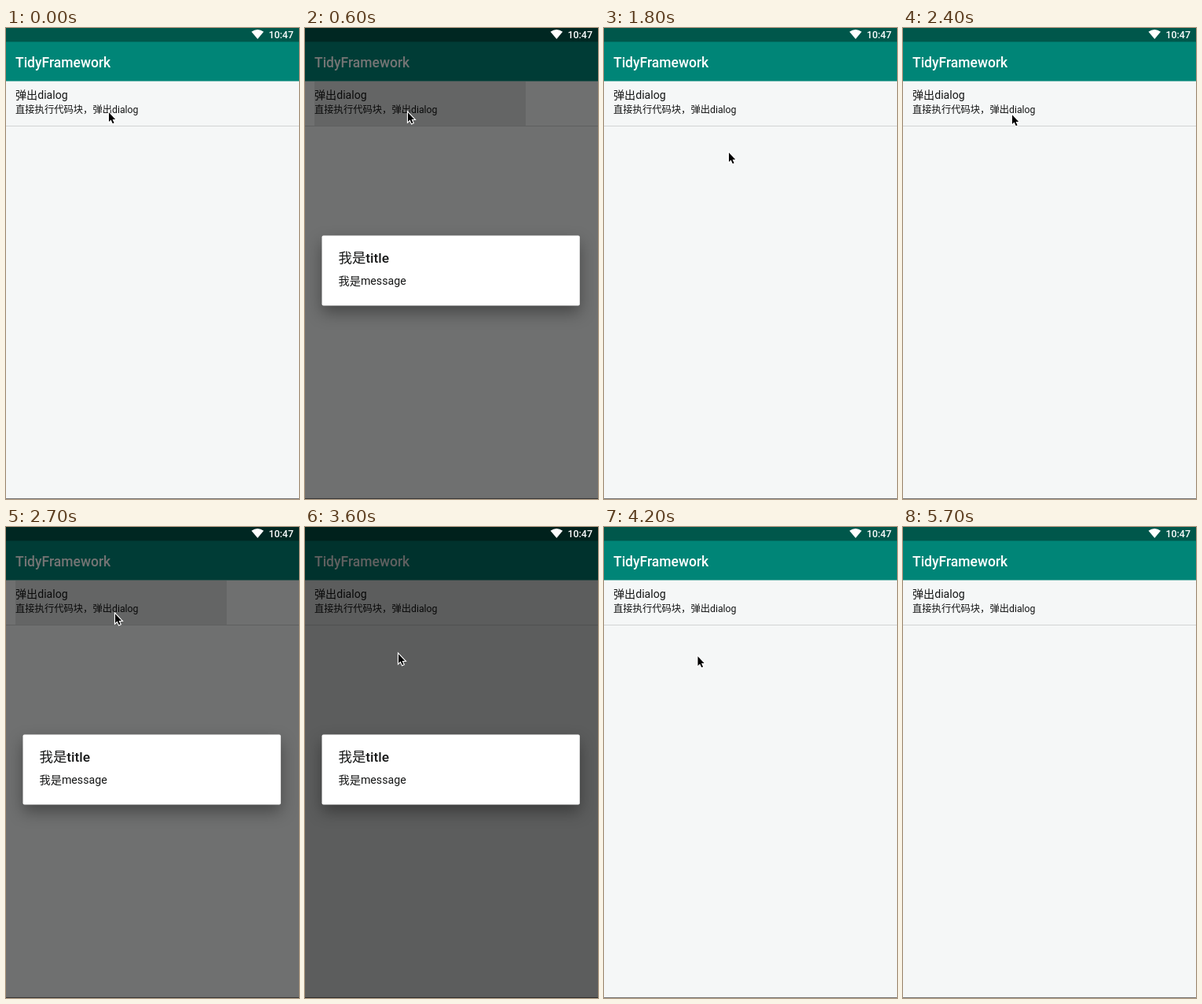
An HTML page that plays this animation: 373x598 px, repeating every 6 s.

```html
<!DOCTYPE html>
<html lang="zh-CN">
<head>
<meta charset="utf-8">
<title>Dialog demo</title>
<style>
  html, body { margin: 0; width: 100%; height: 100%; overflow: hidden; background: #f5f7f7; }
  svg { display: block; width: 373px; height: 598px; }
  text { font-family: Roboto, "Noto Sans CJK SC", "Noto Sans CJK", sans-serif; fill: #151616; }
  .medium { font-weight: 500; }
  .white { fill: #fff; }
  #card { filter: drop-shadow(0 9px 10px rgba(0, 0, 0, .36)); }
</style>
</head>
<body>
<svg viewBox="0 0 373 598">
  <rect width="373" height="598" fill="#f5f7f7"/>
  <rect width="373" height="67.5" fill="#008577"/>
  <rect width="373" height="17.5" fill="#00574b"/>
  <text class="medium white" x="12" y="49.5" font-size="17.5">TidyFramework</text>
  <rect id="ripple" x="12" y="68" width="269" height="56" fill="#000"/>
  <text x="12" y="90" font-size="14.1">弹出dialog</text>
  <text x="12" y="108" font-size="12.3">直接执行代码块，弹出dialog</text>
  <rect y="124" width="373" height="1" fill="#d2d4d4"/>
  <rect y="597" width="373" height="1" fill="#777"/>

  <rect id="scrim" width="373" height="598"/>
  <path class="white" d="M312.5 4.8Q320.3 -.8 328 4.8L320.3 14Z"/>
  <text class="medium white" x="334.5" y="13" font-size="12.4">10:47</text>

  <g id="dialog">
    <rect id="card" x="21.5" y="263.5" width="328.3" height="89" rx="2" fill="#fff"/>
    <text x="42.5" y="298" font-size="17.4">我是<tspan class="medium">title</tspan></text>
    <text x="42.5" y="325.6" font-size="14.2">我是message</text>
  </g>

  <path id="cursor" d="M1 2.2V14L3.6 11.6 5.8 16.2 7.6 15.4 5.6 10.9H9.2Z"
        stroke="#fff" stroke-width="2.2" paint-order="stroke"/>
</svg>
<script>
  const LOOP = 6000, STEP = 300, LEAVE = 4800;
  const FADE_IN = 200, FADE_OUT = 300, RIPPLE = 300;
  const SCRIM = .625;

  const visits = [{ open: 425, close: 1800 }, { open: 2525, close: 4000 }];

  const home = { x: 130, y: 105 };
  const moves = [
    { start: 900, length: 300, x: 158, y: 156 },
    { start: 1800, length: 600, x: 138, y: 108 },
    { start: 3000, length: 300, x: 130, y: 190 },
    { start: 3300, length: 300, x: 118, y: 159 },
    { start: 3900, length: 600, x: 118.5, y: 162.6 }
  ];

  const $ = id => document.getElementById(id);
  const fade = (id, opacity) => $(id).setAttribute("opacity", opacity);
  const clamp = value => Math.min(1, Math.max(0, value));
  const easeOut = part => 1 - (1 - clamp(part)) ** 3;
  const mix = (from, to, part) => from + (to - from) * part;

  const visibility = (time, { open, close }) =>
    clamp((time - open) / FADE_IN) * clamp((close - time) / FADE_OUT);

  const pointerAt = time => moves.reduce((from, to) => {
    const part = easeOut((time - to.start) / to.length);
    return { x: mix(from.x, to.x, part), y: mix(from.y, to.y, part) };
  }, home);

  function draw() {
    const time = Math.floor(performance.now() % LOOP / STEP) * STEP;
    const shown = Math.max(...visits.map(visit => visibility(time, visit)));
    const pressed = visits.some(({ open }) => time > open && time < open + RIPPLE);
    const { x, y } = pointerAt(time);

    fade("scrim", SCRIM * shown);
    fade("dialog", clamp(shown * 1.2));
    fade("ripple", pressed ? .1 : 0);
    fade("cursor", time < LEAVE ? 1 : 0);
    $("cursor").setAttribute("transform", `translate(${x} ${y})`);
    requestAnimationFrame(draw);
  }
  draw();
</script>
</body>
</html>
```
